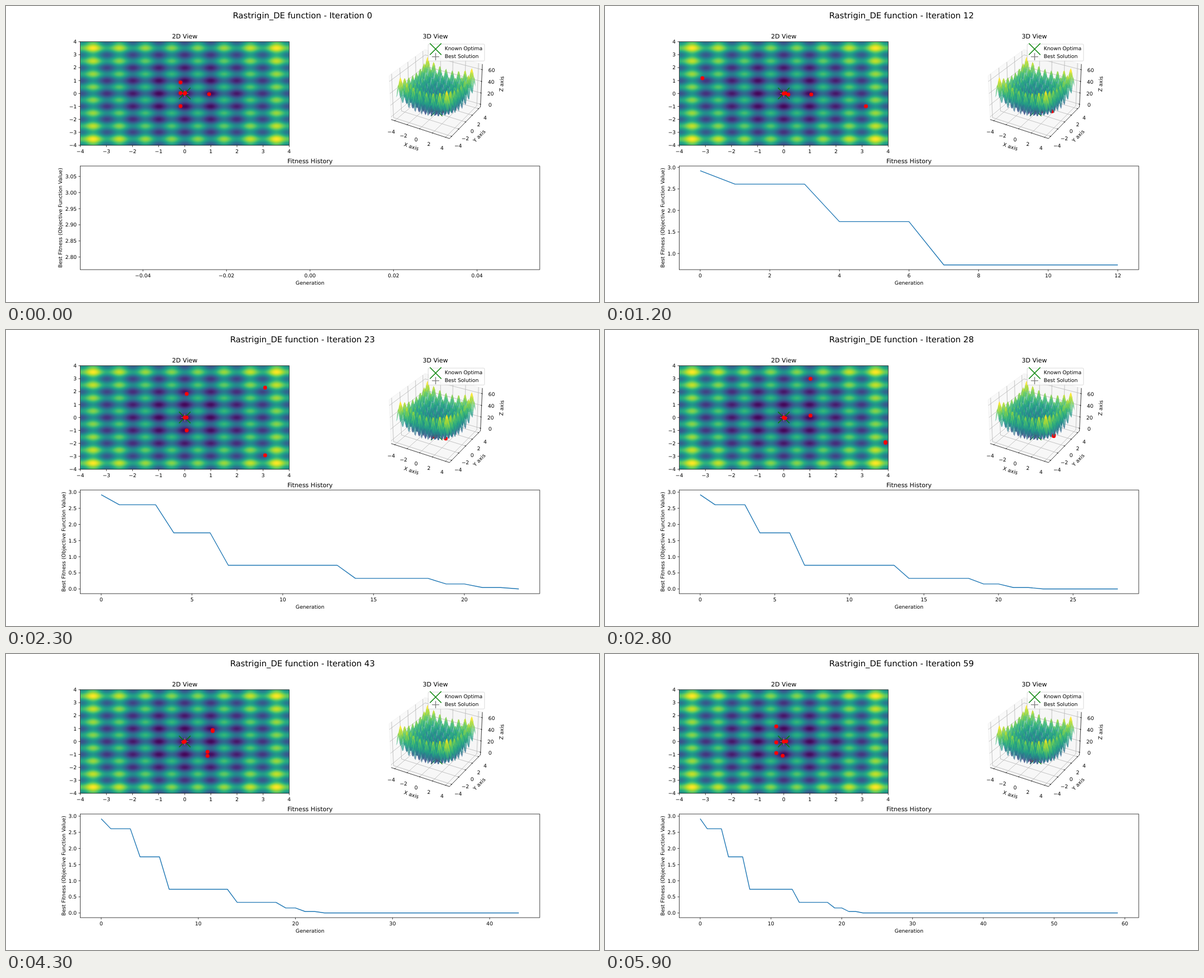
Write an HTML page with a canvas that moves like this. It is 1058 by 529 pixels and loops after 6 s.

```html
<!DOCTYPE html>
<html lang="en">
<head>
<meta charset="utf-8">
<title>Rastrigin_DE function</title>
<style>
  html, body { margin: 0; width: 100%; height: 100%; overflow: hidden; background: #fff; }
  canvas, svg { position: absolute; left: 0; top: 0; display: block; }
  text { font-family: "DejaVu Sans", Verdana, sans-serif; font-size: 9.18px; text-rendering: geometricPrecision; }
</style>
</head>
<body>
<canvas id="heat"></canvas>
<svg id="stage" width="1058" height="529" viewBox="0 0 1058 529"></svg>
<script>
const STEP_MS = 100, STEPS = 60;
const EM = 9.18, THIN = 0.735, TICK = 3.21;
const MAP = { l: 132.58, t: 63.81, w: 372.7, h: 185.15 };
const HIST = { l: 132.58, t: 285.99, w: 819.6, h: 185.15 };
const stage = document.getElementById('stage');

// ---------- helpers ----------
function add(parent, tag, attrs) {
  const el = document.createElementNS('http://www.w3.org/2000/svg', tag);
  for (const key in attrs) el.setAttribute(key, attrs[key]);
  parent.appendChild(el);
  return el;
}
const group = () => add(stage, 'g', {});

function label(parent, str, x, y, { anchor = 'middle', size, angle, pivot = y } = {}) {
  const el = add(parent, 'text', { x, y, 'text-anchor': anchor });
  if (size) el.style.fontSize = size + 'px';
  if (angle) el.setAttribute('transform', `rotate(${angle} ${x} ${pivot})`);
  el.textContent = str;
  return el;
}
const path = (parent, d, stroke = '#000', width = THIN) =>
  add(parent, 'path', { d, fill: 'none', stroke, 'stroke-width': width, 'stroke-linejoin': 'round' });
const toPath = pts => 'M' + pts.map(p => p[0].toFixed(2) + ' ' + p[1].toFixed(2)).join('L');
const dot = (parent, x, y) => add(parent, 'circle', { cx: x, cy: y, r: 3.4, fill: '#f00' });
const cross = (parent, x, y, r = 10.2) =>
  path(parent, `M${x - r} ${y - r}l${2 * r} ${2 * r}m0 ${-2 * r}l${-2 * r} ${2 * r}`, '#008000', 1.38);
const plus = (parent, x, y, r = 6.5) =>
  path(parent, `M${x - r} ${y}h${2 * r}M${x} ${y - r}v${2 * r}`, '#808080', 1.38);
const frame = b => add(stage, 'rect',
  { x: b.l, y: b.t, width: b.w, height: b.h, fill: 'none', stroke: '#000', 'stroke-width': THIN });
const number = (v, digits) => (v < 0 ? '\u2212' : '') + Math.abs(v).toFixed(digits);

function xTick(parent, b, x, str) {
  const y = b.t + b.h;
  path(parent, `M${x} ${y}v${TICK}`);
  label(parent, str, x, y + 13.7);
}
function yTick(parent, b, y, str) {
  path(parent, `M${b.l} ${y}h${-TICK}`);
  label(parent, str, b.l - 2 * TICK, y + 3.4, { anchor: 'end' });
}

// ---------- objective and colours ----------
const wave = v => 10 + v * v - 10 * Math.cos(2 * Math.PI * v);
const rastrigin = (x, y) => wave(x) + wave(y);
const TOP = 64.62;

const STOPS = '440154 472d7b 3b528b 2c728e 21918c 28ae80 5ec962 addc30 fde725'.split(' ')
  .map(hex => hex.match(/../g).map(c => parseInt(c, 16)));
function viridis(t) {
  const s = Math.min(1, Math.max(0, t)) * (STOPS.length - 1);
  const i = Math.min(STOPS.length - 2, Math.floor(s));
  return STOPS[i].map((c, n) => Math.round(c + (STOPS[i + 1][n] - c) * (s - i)));
}

function paintHeat() {
  const cv = document.getElementById('heat');
  const w = cv.width = 746, h = cv.height = 370;
  Object.assign(cv.style, { left: MAP.l + 'px', top: MAP.t + 'px', width: MAP.w + 'px', height: MAP.h + 'px' });
  const ctx = cv.getContext('2d'), img = ctx.createImageData(w, h);
  for (let j = 0, o = 0; j < h; j++)
    for (let i = 0; i < w; i++, o += 4) {
      const z = rastrigin((i + 0.5) / w * 8 - 4, 4 - (j + 0.5) / h * 8);
      img.data.set([...viridis(z / TOP), 255], o);
    }
  ctx.putImageData(img, 0, 0);
}

// ---------- perspective view, elevation 30, azimuth -60 ----------
const H = 0.5952, HZ = 0.4464;
const C = Math.sqrt(3) / 2;
function project(x, y, z) {
  const u = C * x + 0.5 * y;
  const v = -0.25 * x + C / 2 * y + C * z;
  const d = C / 2 * x - 0.75 * y + 0.5 * z;
  const s = 1000.8 / (10 - d);
  return [768.35 + u * s, 153.55 - v * s, d];
}
const boxX = x => x * 0.12987;
const boxZ = z => (z - TOP / 2) * 0.012063;
const project3 = (x, y, z) => project(boxX(x), boxX(y), boxZ(z));
const path3 = pts => toPath(pts.map(p => project(...p)));

function drawBox(g) {
  const line = (pts, stroke) => path(g, path3(pts), stroke);
  const pane = (pts, fill) =>
    add(g, 'path', { d: path3(pts) + 'Z', fill, stroke: '#f1f1f1', 'stroke-width': 0.9 });
  pane([[-H, -H, -HZ], [-H, H, -HZ], [-H, H, HZ], [-H, -H, HZ]], '#f9f9f9');
  pane([[-H, H, -HZ], [H, H, -HZ], [H, H, HZ], [-H, H, HZ]], '#f6f6f6');
  pane([[-H, -H, -HZ], [H, -H, -HZ], [H, H, -HZ], [-H, H, -HZ]], '#f7f7f7');

  const flat = [-4, -2, 0, 2, 4], high = [0, 20, 40, 60], grid = '#b0b0b0';
  for (const p of flat.map(boxX)) {
    line([[p, -H, -HZ], [p, H, -HZ], [p, H, HZ]], grid);
    line([[H, p, -HZ], [-H, p, -HZ], [-H, p, HZ]], grid);
  }
  for (const z of high.map(boxZ)) line([[-H, -H, z], [-H, H, z], [H, H, z]], grid);
  line([[-H, -H, -HZ], [H, -H, -HZ], [H, H, -HZ], [H, H, HZ]]);

  const tag = (p, dx, dy, t) => {
    const [x, y] = project(...p);
    label(g, number(t, 0), x + dx, y + dy + 3.7);
  };
  const out = H + 0.01, inn = H - 0.02;
  for (const t of flat) {
    const p = boxX(t);
    line([[p, -out, -HZ], [p, -inn, -HZ]]);
    line([[out, p, -HZ], [inn, p, -HZ]]);
    tag([p, -H, -HZ], -6.3, 19, t);
    tag([H, p, -HZ], 11.6, 16.2, t);
  }
  for (const t of high) {
    const z = boxZ(t);
    line([[out, H, z], [inn, H, z]]);
    tag([H, H, z], 16.9, 0.7, t);
  }
  const axisName = (str, x, y, angle) => label(g, str, x, y + 3.2, { angle, pivot: y });
  axisName('X axis', 723.3, 251.3, 18);
  axisName('Y axis', 844.3, 232.3, -45.8);
  axisName('Z axis', 884.3, 139.3, -87.4);
}

function drawSurface(g) {
  const n = 50, at = i => -4 + 8 * i / n, faces = [];
  for (let i = 0; i < n; i++) for (let j = 0; j < n; j++) {
    const ring = [[i, j], [i + 1, j], [i + 1, j + 1], [i, j + 1]].map(([a, b]) => {
      const x = at(a), y = at(b), z = rastrigin(x, y);
      return { z, p: project3(x, y, z) };
    });
    const mean = f => ring.reduce((sum, q) => sum + f(q), 0) / 4;
    faces.push({ d: toPath(ring.map(q => q.p)) + 'Z', z: mean(q => q.z), depth: mean(q => q.p[2]) });
  }
  const peak = Math.max(...faces.map(f => f.z));
  faces.sort((a, b) => a.depth - b.depth);
  for (const f of faces)
    add(g, 'path', { d: f.d, fill: `rgb(${viridis(f.z / peak)})`, 'fill-opacity': 0.7 });
}

function drawLegend(g) {
  add(g, 'rect', { x: 753.2, y: 68.1, width: 100.6, height: 30.2, rx: 1.8,
    fill: '#fff', 'fill-opacity': 0.8, stroke: '#ccc', 'stroke-opacity': 0.8, 'stroke-width': 0.92 });
  cross(g, 766.5, 77);
  plus(g, 766.5, 90.6);
  label(g, 'Known Optima', 782.7, 79.2, { anchor: 'start' });
  label(g, 'Best Solution', 782.7, 92.8, { anchor: 'start' });
}

// ---------- population per generation ----------
function random(seed) {
  return () => {
    seed = (seed + 0x6D2B79F5) | 0;
    let t = Math.imul(seed ^ (seed >>> 15), 1 | seed);
    t ^= t + Math.imul(t ^ (t >>> 7), 61 | t);
    return ((t ^ (t >>> 14)) >>> 0) / 4294967296;
  };
}
// a core at the optimum, plus trials near other valleys that sometimes share a coordinate
function swarm(k) {
  const rnd = random(k * 7919 + 11);
  const bell = () => rnd() + rnd() + rnd() - 1.5;
  const valley = () => Math.max(-3.9, Math.min(3.9, Math.round(bell() * 3) + bell() * 0.25));
  const pts = [[0, 0], [bell() * 0.1, bell() * 0.1]];
  let x = valley();
  for (let i = 0; i < 4; i++) {
    if (rnd() < 0.65) x = valley();
    pts.push([x, valley()]);
  }
  return pts;
}

// ---------- fitness history ----------
const DROPS = [[0, 2.9216], [1, 2.61], [4, 1.74], [7, 0.735], [14, 0.328], [19, 0.155], [21, 0.045], [23, 0.002]];
const fitness = g => DROPS.filter(d => d[0] <= g).pop()[1];

function limits(lo, hi) {
  if (lo === hi) {
    const grow = lo ? lo * 0.05 : 0.05;
    lo -= grow;
    hi += grow;
  }
  const pad = (hi - lo) * 0.05;
  return [lo - pad, hi + pad];
}
function ticks([lo, hi]) {
  const raw = (hi - lo) / 9, mag = 10 ** Math.floor(Math.log10(raw));
  const step = [1, 2, 2.5, 5, 10].find(s => s * mag >= raw - 1e-9) * mag;
  let digits = 0;
  while (Math.abs(step * 10 ** digits - Math.round(step * 10 ** digits)) > 1e-6) digits++;
  const list = [];
  for (let i = Math.ceil(lo / step); i * step <= hi; i++) list.push([i * step, number(i * step, digits)]);
  return { list, digits };
}

function drawHistory(g, k) {
  const xl = limits(0, k), yl = limits(fitness(k), fitness(0));
  const px = v => HIST.l + (v - xl[0]) / (xl[1] - xl[0]) * HIST.w;
  const py = v => HIST.t + (yl[1] - v) / (yl[1] - yl[0]) * HIST.h;
  const yt = ticks(yl);
  for (const [v, str] of ticks(xl).list) xTick(g, HIST, px(v), str);
  for (const [v, str] of yt.list) yTick(g, HIST, py(v), str);
  if (k) path(g, toPath(Array.from({ length: k + 1 }, (_, i) => [px(i), py(fitness(i))])), '#1f77b4', 1.38);
  const tagWidth = (0.954 + 0.636 * yt.digits) * EM;
  label(g, 'Best Fitness (Objective Function Value)',
    HIST.l - 2 * TICK - tagWidth - 5.9, HIST.t + HIST.h / 2, { angle: -90 });
}

// ---------- static parts ----------
paintHeat();
const mapX = x => MAP.l + (x + 4) / 8 * MAP.w;
const mapY = y => MAP.t + (4 - y) / 8 * MAP.h;

const title = label(stage, '', 529, 22, { size: 14.7 });
const heading = (str, x, y) => label(stage, str, x, y, { size: 11.02 });
heading('2D View', MAP.l + MAP.w / 2, 58.2);
heading('3D View', 766, 58.2);
heading('Fitness History', HIST.l + HIST.w / 2, 280.5);
label(stage, 'Generation', HIST.l + HIST.w / 2, 497.7);

cross(stage, mapX(0), mapY(0));
plus(stage, mapX(0), mapY(0));
const mapDots = group();
frame(MAP);
for (let t = -4; t <= 4; t++) {
  xTick(stage, MAP, mapX(t), number(t, 0));
  yTick(stage, MAP, mapY(t), number(t, 0));
}

drawBox(group());
const [bestX, bestY] = project3(0, 0, 0);
cross(stage, bestX, bestY);
plus(stage, bestX, bestY);
const boxDots = group();
drawSurface(group());
drawLegend(group());

const history = group();
frame(HIST);

// ---------- animation ----------
function draw(k) {
  title.textContent = 'Rastrigin_DE function - Iteration ' + k;
  for (const g of [mapDots, boxDots, history]) g.replaceChildren();
  for (const [x, y] of swarm(k)) {
    dot(mapDots, mapX(x), mapY(y));
    const [px, py] = project3(x, y, rastrigin(x, y));
    dot(boxDots, px, py);
  }
  drawHistory(history, k);
}

let shown = 0;
const start = performance.now();
draw(0);
function tick() {
  const k = Math.floor((performance.now() - start) / STEP_MS) % STEPS;
  if (k !== shown) draw(shown = k);
  requestAnimationFrame(tick);
}
requestAnimationFrame(tick);
</script>
</body>
</html>
```
